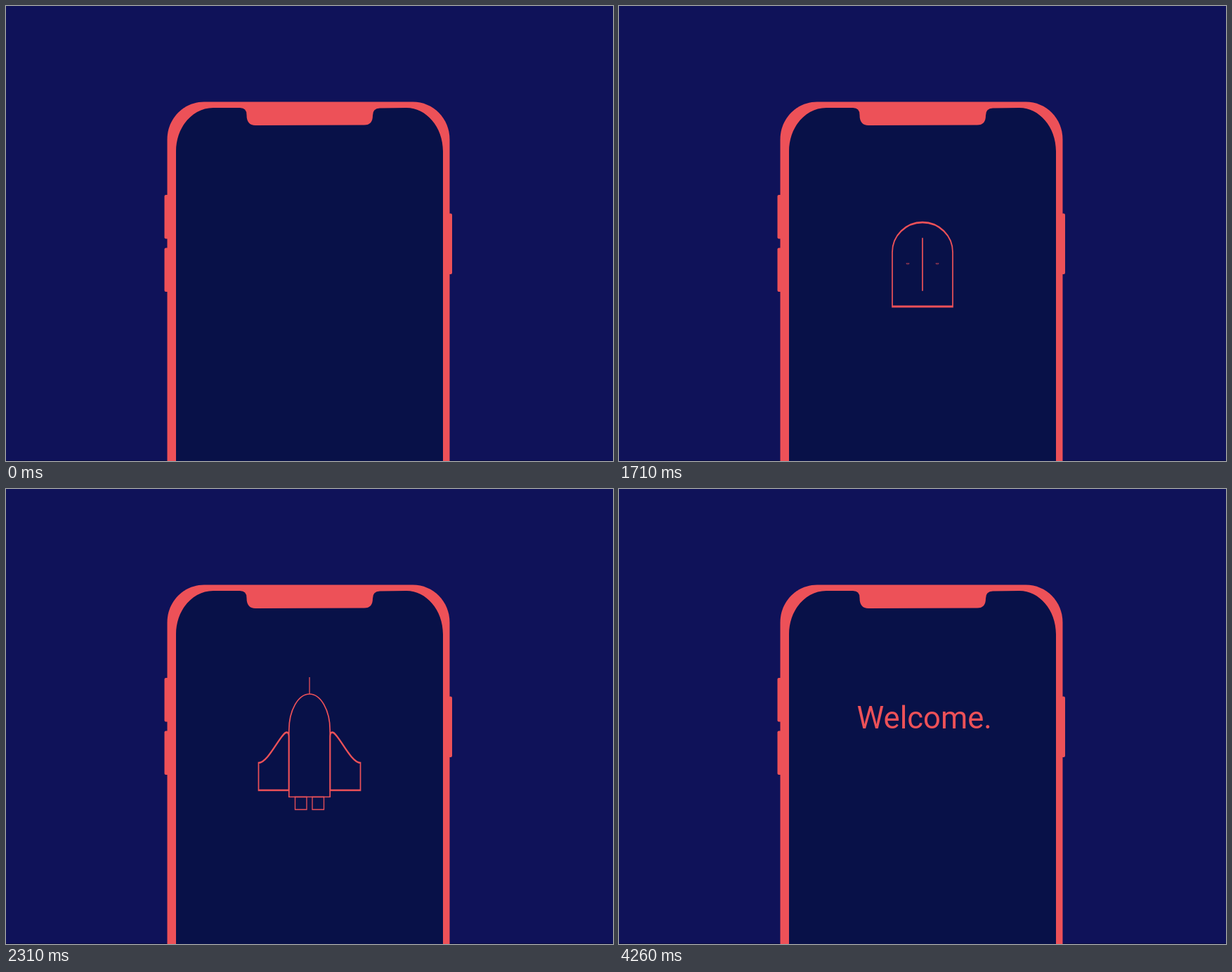
An HTML page that plays this animation: 864 px wide and 648 px high, repeating every 4.35 s.

```html
<!DOCTYPE html>
<html lang="en">
<head>
<meta charset="utf-8">
<title>Welcome</title>
<style>
  html, body { margin: 0; width: 100%; height: 100%; overflow: hidden; background: #0f1259; }
  svg { display: block; width: 100vw; height: 100vh; }
  .line { fill: none; stroke: #ed5158; stroke-width: 1.7; }
  .thin { stroke-width: 1.3; }
  .solid { fill: #ed5158; }
  text { font: 400 43.6px Roboto, Arial, sans-serif; }
</style>
</head>
<body>
<svg viewBox="0 0 864 648">
  <defs>
    <path id="glass" d="M242 648V207C242 172 266 145 295 145H333Q342.500 145 342.500 155Q342.500 170 355 170L510 169.500Q522 169.500 522 156Q522 145.500 532 145.500L570 145C598 145 622 172 622 207V648Z"/>
    <clipPath id="screen"><use href="#glass"/></clipPath>
  </defs>
  <rect width="864" height="648" fill="#0f1259"/>
  <rect y="647" width="864" height="1" fill="#0a0c40"/>
  <g class="solid">
    <path d="M229.500 648V190C229.500 160 253 136.500 282 136.500H579C608 136.500 631.500 160 631.500 190V648Z"/>
    <rect x="225.500" y="269" width="8" height="62.500" rx="2"/>
    <rect x="225.500" y="344.500" width="8" height="62.500" rx="2"/>
    <rect x="627" y="295.500" width="8" height="86.500" rx="2"/>
  </g>
  <use href="#glass" fill="#081148"/>
  <g clip-path="url(#screen)">
    <path id="lock" class="line"/>
    <g id="ship">
      <path id="body" class="line"/>
      <path id="mast" class="line thin"/>
    </g>
    <g id="half">
      <path id="leaf" class="line"/>
      <path id="handle" class="line thin" d="M-5.500-1.500H5.500M-4.500-1.500V0Q-4.500 2-2.500 2H2.500Q4.500 2 4.500 0V-1.500"/>
      <path id="nozzle" class="line thin"/>
      <rect id="flame" class="solid" x="413" width="13" rx="6.500"/>
    </g>
    <use href="#half" transform="translate(864) scale(-1 1)"/>
    <text id="hello" class="solid" x="338.500" y="340.500" opacity="0">Welcome.</text>
  </g>
</svg>
<script>
const LOOP = 4350, STEP = 30, MID = 432, HALF = 43, BASE = 428;
const [lock, body, mast, leaf, handle, nozzle, flame, hello] =
  ['lock', 'body', 'mast', 'leaf', 'handle', 'nozzle', 'flame', 'hello']
    .map(id => document.getElementById(id));

const mix = (a, b, p) => a + (b - a) * p;
const ramp = (t, a, b) => Math.min(1, Math.max(0, (t - a) / (b - a)));
const draw = (node, d) => node.setAttribute('d', d);

// Ease-out with an overshoot of about one half
const spring = p => 1 + 6 * (p - 1) ** 3 + 5 * (p - 1) ** 2;

function dome(half, low, side, top) {
  const l = MID - half, r = MID + half, bend = half * .55;
  const k = mix(side, top, .55);
  return `M${l} ${low}V${side}C${l} ${k} ${MID - bend} ${top} ${MID} ${top}` +
    `C${MID + bend} ${top} ${r} ${k} ${r} ${side}V${low}Z`;
}

// Half of an arched door that turns into a wing as open goes to 1
function wing(x, y, shoulder, peak, open) {
  const l = x - HALF, top = y - peak, low = y - shoulder;
  return `M${x} ${y}H${l}V${low}` +
    `C${l + 13 * open} ${low - 24 * (1 - open)}` +
    ` ${x - 24 + 10 * open} ${mix(top, low, .2 * open)}` +
    ` ${x - 5 * open} ${mix(top, low, .06 * open)}` +
    `Q${x} ${top} ${x} ${top + 8 * open}Z`;
}

function drawLock(t) {
  lock.setAttribute('opacity', ramp(t, 450, 900));
  if (t >= 1800) return draw(lock, '');
  const p = ramp(t, 1080, 1650);
  const arch = 332 - 24 * spring(p) + HALF;
  const top = mix(376, 308, p ** 2.5);
  const side = mix(376, 350.5, ramp(t, 1470, 1650));
  const thick = ramp(t, 1620, 1740);
  const slit = mix(4, 60, ramp(t, 1080, 1800) ** 3.8);
  draw(lock, dome(HALF, BASE - thick, side, top - thick / 2) +
    dome(HALF, BASE + thick, side, top + thick) +
    `M${MID - HALF} ${arch}A43 43 0 0 1 ${MID + HALF} ${arch}V376` +
    `M${MID} ${(top + BASE) / 2 - slit}v${2 * slit}`);
}

function drawShip(t) {
  const open = ramp(t, 1950, 2100), fold = ramp(t, 2190, 2310);
  const frames = Math.max(0, (t - 2610) / STEP);
  const lift = 9.75 * frames ** 2;
  const show = on => on && t >= 1800 && t < 2850;

  const gap = 29.5 * spring(ramp(t, 1950, 2286));
  const x = MID - gap, foot = mix(BASE, 429, open) - lift;
  const shoulder = mix(78 - 5 * open, 39, fold);
  const peak = mix(120.5 - 33 * open, 84.5, fold);
  const thick = mix(1.1, .5, open);
  const side = dy => wing(x, foot + dy, shoulder, peak, open);
  draw(leaf, show(true) ? side(-thick) + side(thick) : '');

  const grip = ramp(t, 1650, 1800) * (1 - ramp(t, 1950, 2070));
  handle.setAttribute('transform', `translate(${x - 21} 367) scale(${grip})`);
  handle.setAttribute('visibility', grip ? 'visible' : 'hidden');

  const half = gap - mix(2.5, .3, fold);
  const low = BASE + 9 * open + 1.5 * fold;
  const top = 308 - 8.5 * open - 7.5 * fold - lift;
  draw(body, show(half > 0) ? dome(half, low - lift, 350 - 6.5 * fold - lift, top) : '');

  const tall = 24 * ramp(t, 2070, 2190);
  draw(mast, show(tall) ? `M${MID} ${top}v${-tall}` : '');

  const size = 9 * ramp(t, 2130, 2190) + 9 * spring(fold);
  draw(nozzle, show(size) ? `M411.500 ${low - 1.147 * lift}h16.500v${size}h-16.500Z` : '');

  const length = 18 * frames;
  flame.setAttribute('y', 482 - 43 * Math.max(0, frames - 2) ** 1.2 - length);
  flame.setAttribute('height', show(length) ? length : 0);
}

function render(ms) {
  const t = Math.floor((ms % LOOP) / STEP) * STEP;
  drawLock(t);
  drawShip(t);
  hello.setAttribute('opacity', ramp(t, 3300, 3720));
}

const start = performance.now();
function tick() {
  render(performance.now() - start);
  requestAnimationFrame(tick);
}
tick();
</script>
</body>
</html>
```
